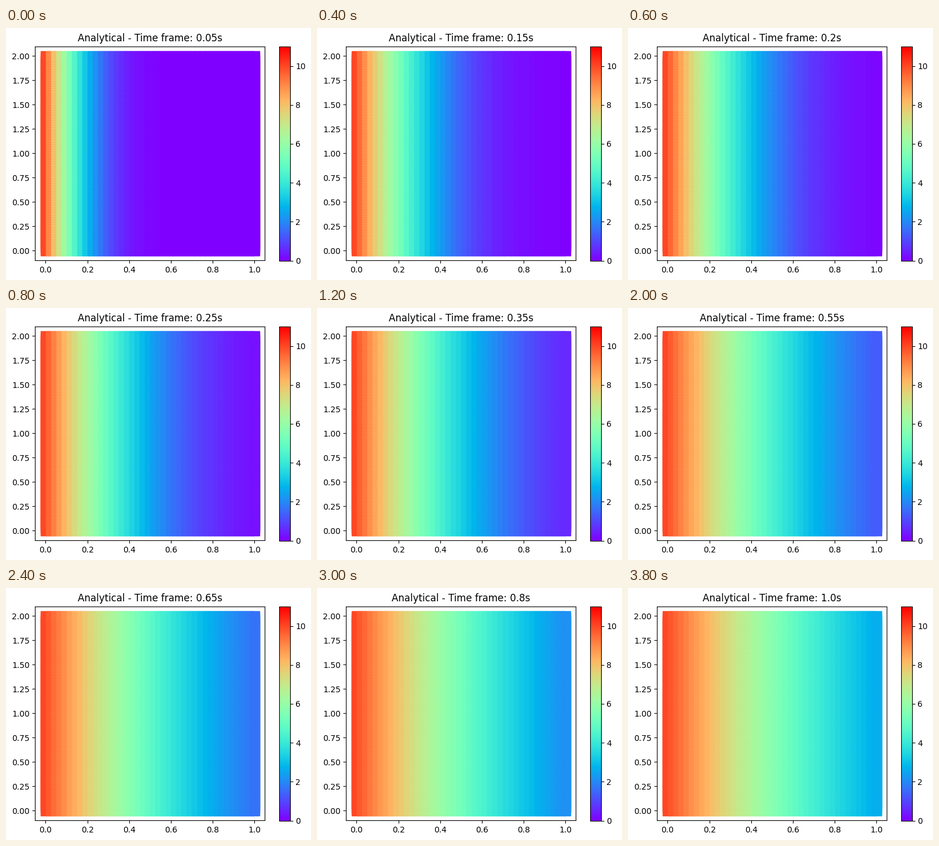
Animation of 527x435 px, one loop 4 s. Source, as a matplotlib script:

```python
import math

import numpy as np
import matplotlib.pyplot as plt
from matplotlib.animation import FuncAnimation

W, H, DPI = 527, 435, 100
FRAMES, INTERVAL = 20, 200
DT = 0.05
C0 = 10.0      # concentration held at x = 0
D = 0.4        # diffusivity

plt.rcParams["font.family"] = "DejaVu Sans"
erfc = np.vectorize(math.erfc)


def px_axes(fig, left, top, width, height):
    return fig.add_axes([left / W, 1 - (top + height) / H, width / W, height / H])


def field(t):
    profile = C0 * erfc(x / (2 * math.sqrt(D * t)))
    return np.tile(profile, len(y))


def title(t):
    return f"Analytical - Time frame: {round(t, 2)}s"


x = np.linspace(0, 1, 41)
y = np.linspace(0, 2, 81)
X, Y = np.meshgrid(x, y)

fig = plt.figure(figsize=(W / DPI + 1e-6, H / DPI + 1e-6), dpi=DPI, facecolor="white")
ax = px_axes(fig, 50.43, 31.68, 396.8, 369.6)
cax = px_axes(fig, 472.04, 31.92, 18.48, 369.6)

dots = ax.scatter(X.ravel(), Y.ravel(), c=field(DT), s=150, marker="s",
                  cmap="rainbow", vmin=0, vmax=11)
fig.colorbar(dots, cax=cax)
ax.set_title(title(DT))


def update(i):
    t = DT * (i + 1)
    dots.set_array(field(t))
    ax.set_title(title(t))
    return [dots]


anim = FuncAnimation(fig, update, frames=FRAMES, interval=INTERVAL,
                     repeat=True, repeat_delay=0, blit=False)
plt.show()
```
